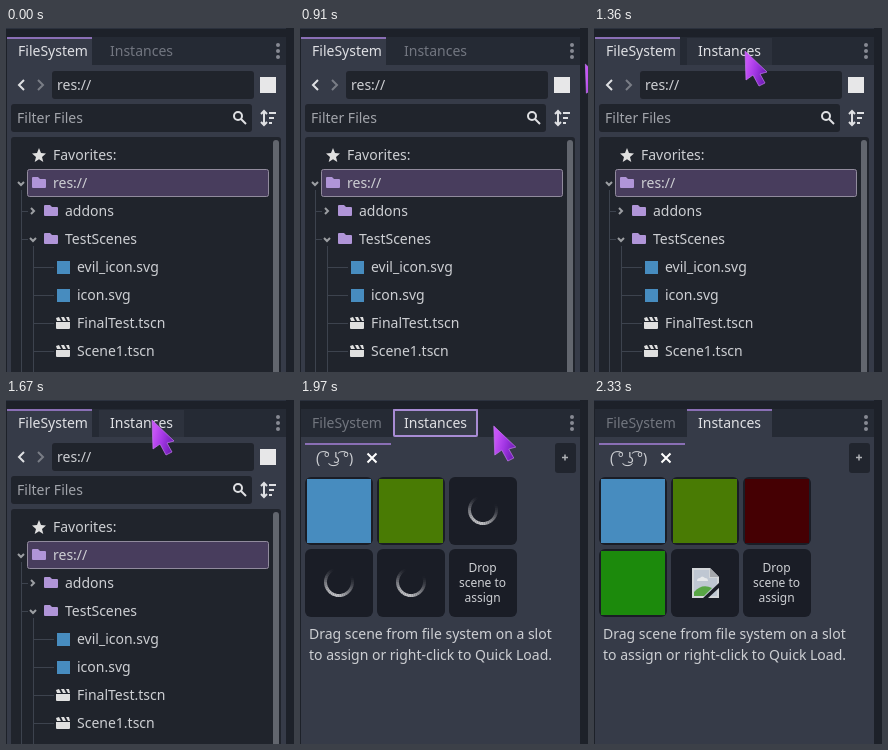
Recreate the animation shown at these times as an HTML page. Size 288 px wide and 344 px high, loop 3030 ms.

```html
<!DOCTYPE html>
<html lang="en">
<head>
<meta charset="utf-8">
<style>
  html, body { margin: 0; height: 100%; overflow: hidden; background: #1d2129; }
  svg { display: block; }
  text { font: 14px "Noto Sans", "Open Sans", sans-serif; fill: #cdcfd3; white-space: pre; }
  .line { fill: none; stroke: #3d434e; }
  .icon { fill: none; stroke: #dfe0e3; stroke-width: 2; }
  .thin { stroke-width: 1.5; }
  .dark { fill: #20242c; }
  .slot { fill: #1a1d26; }
  .small { font-size: 12px; text-anchor: middle; }
</style>
</head>
<body>
<svg width="288" height="344" viewBox="0 0 288 344">
  <defs>
    <linearGradient id="purple" x1="0" y1=".3" x2="1" y2=".7">
      <stop offset=".1" stop-color="#c653f6"/>
      <stop offset=".5" stop-color="#a236e4"/>
      <stop offset="1" stop-color="#6a1bb0"/>
    </linearGradient>
    <path id="folder" d="M-7-5q0-1 1-1h5l2 2h5q1 0 1 1v7q0 1-1 1H-6q-1 0-1-1z" fill="#b095d8"/>
    <path id="clapper" fill="#e0e0e0" d="M-7-1H7V5q0 1-1 1H-6q-1 0-1-1zM-7-5l3-1 2 4h-4zM-2-6h3l2 4H0zM3-6h3l1 4H5z"/>
    <g id="spinner"></g>
  </defs>

  <path fill="#2b313d" d="M0 0H280V1H0z"/>
  <path fill="#252a34" d="M1 9H280V37H1z"/>
  <path fill="#363b48" d="M1 37H280V344H1z"/>
  <path id="hover" fill="#2d323d" d="M93 10H178V37H93z"/>
  <g id="tab">
    <path fill="#363b48" d="M0 10H85V38H0z"/>
    <path fill="#8a6fb5" d="M0 9H85V11H0z"/>
  </g>
  <rect id="focus" x="94" y="10" width="83" height="26" rx="1" fill="none" stroke="#a88cd4" stroke-width="2"/>
  <text id="filesTitle" x="12" y="28">FileSystem</text>
  <text id="slotsTitle" x="104" y="28">Instances</text>
  <g fill="#878a93"><circle cx="272" cy="17" r="2"/><circle cx="272" cy="23" r="2"/><circle cx="272" cy="29" r="2"/></g>

  <g id="files">
    <path class="icon" d="M18 52l-5 5 5 5"/>
    <path class="icon" d="M32 52l5 5-5 5" opacity=".4"/>
    <rect class="dark" x="46" y="43" width="202" height="28" rx="3"/>
    <text x="51" y="62">res://</text>
    <path fill="#e7e7e8" d="M254 49h16v16h-16z"/>
    <rect class="dark" x="5" y="76" width="241" height="28" rx="3"/>
    <text x="11" y="95" style="fill:#a1a4aa">Filter Files</text>
    <g class="icon"><circle cx="232" cy="88" r="4"/><path d="M235 91l5 5"/></g>
    <path class="icon" d="M258 84v12M255 86l3-3 3 3M255 94l3 3 3-3M263 85h7M263 90h5M263 95h3"/>
    <path fill="#20242c" d="M5 112q0-3 3-3H272q3 0 3 3V344H5z"/>
    <rect x="267" y="112" width="6" height="240" rx="3" fill="#62666e"/>
    <path class="line" d="M15.5 162V344M15 183.5h7M15 211.5h7M27.5 218V344M27 239.5h21M27 267.5h21M27 295.5h21M27 323.5h21"/>
    <rect x="21.5" y="141.5" width="241" height="27" rx="2" fill="#483d5d" stroke="#918b9d"/>
    <path fill="#e0e0e0" d="M33 120l2 5 5 .4-4 3.5 1.3 5.1-4.3-2.7-4.3 2.7 1.3-5.1-4-3.5 5-.4z"/>
    <path class="icon" opacity=".65" d="M12 154l3 3 3-3M25 180l3 3-3 3M24 210l3 3 3-3"/>
    <use href="#folder" x="33" y="155"/>
    <use href="#folder" x="45" y="183"/>
    <use href="#folder" x="45" y="211"/>
    <path fill="#478cbf" d="M51 233h13v13H51zM51 261h13v13H51z"/>
    <use href="#clapper" x="57" y="295"/>
    <use href="#clapper" x="57" y="323"/>
    <text x="47" y="132">Favorites:</text>
    <text x="47" y="160">res://</text>
    <text x="59" y="188">addons</text>
    <text x="59" y="216">TestScenes</text>
    <text x="71" y="244">evil_icon.svg</text>
    <text x="71" y="272">icon.svg</text>
    <text x="71" y="300">FinalTest.tscn</text>
    <text x="71" y="328">Scene1.tscn</text>
  </g>

  <g id="slots">
    <path fill="#8a6fb5" d="M5 43H91V45H5z"/>
    <text x="16" y="63">( ͡° ͜ʖ ͡°)</text>
    <path class="icon" d="M67.5 53.5l9 9M76.5 53.5l-9 9" style="stroke:#fff"/>
    <rect x="255" y="43" width="21" height="30" rx="3" fill="#21252e"/>
    <path class="icon thin" d="M262 57.5h6M265 54.5v6" opacity=".75"/>
    <g id="grid"></g>
    <rect class="slot" x="149" y="149" width="68" height="68" rx="6"/>
    <text class="small" x="182.5" y="172">Drop</text>
    <text class="small" x="182.5" y="187">scene to</text>
    <text class="small" x="182.5" y="202">assign</text>
    <g id="broken" transform="translate(98 168)">
      <path fill="#d3d6d9" d="M0 0H18L27 9V30H0z"/>
      <path fill="#bfc7d2" d="M2 2H17V10H25V28H2z"/>
      <path fill="#e6e8ea" d="M5 13q0-3 3-3 2-3 5 0 3 0 3 3z"/>
      <path fill="#58a545" d="M2 28V24Q10 15 20 20L12 28z"/>
      <path fill="#a5a8ad" d="M18 0V9H27z"/>
      <path fill="#1a1d26" d="M28 14L10 31H15L28 19z"/>
    </g>
    <text x="9" y="239">Drag scene from file system on a slot</text>
    <text x="9" y="260">to assign or right-click to Quick Load.</text>
  </g>

  <path id="cursor" d="M0 0L1 29 8 24 14 35 20 32 15 23 22 21z" fill="url(#purple)" stroke="#c47af0" stroke-opacity=".7" stroke-linejoin="round"/>
</svg>
<script>
const LOOP = 3030, OPEN = 1850;
const $ = id => document.getElementById(id);
const show = (el, on) => el.style.display = on ? "" : "none";

// Spinner: an open ring, brightest in the middle (angle 0) and fading to both ends
const SEGMENTS = 36, STEP = 0.14;
const point = a => `${13.5 * Math.cos(a)} ${13.5 * Math.sin(a)}`;
$("spinner").innerHTML = Array.from({ length: SEGMENTS }, (_, i) => {
  const a = (i - SEGMENTS / 2) * STEP;
  const glow = Math.sin(Math.PI * (i + 0.5) / SEGMENTS) ** 2;
  return `<path d="M${point(a)}A13.5 13.5 0 0 1 ${point(a + STEP)}" fill="none"
    stroke="#e0e0e2" stroke-width="3" opacity="${glow * 0.85}"/>`;
}).join("");

const loads = [
  [1880, "#478cbf"], [1940, "#497b04"], [2030, "#450003"], [2090, "#1c8a0c"], [2330, null]
];
$("grid").innerHTML = loads.map(([, color], i) => `
  <g transform="translate(${5 + i % 3 * 72} ${77 + Math.floor(i / 3) * 72})">
    <rect class="slot" width="68" height="68" rx="6"/>
    <g class="wait"><use href="#spinner"/></g>
    ${color ? `<path class="done" fill="${color}" d="M2 2H66V66H2z"/>` : ""}
  </g>`).join("");
const cells = [...$("grid").children].map(g => ({
  wait: g.querySelector(".wait"),
  done: g.querySelector(".done") || $("broken")
}));

const path = [
  [910, 286, 36], [990, 236, 46], [1120, 167, 33], [1240, 138, 22],
  [1360, 151, 23], [1520, 151, 23], [1670, 146, 20], [OPEN, 146, 20]
];

function cursorAt(t) {
  if (t >= OPEN) {
    const u = (t - OPEN) / 120;
    return [146 + 47 * u * u, 20 + 6 * u];
  }
  const i = path.findIndex(p => p[0] > t);
  const [t0, x0, y0] = path[i - 1], [t1, x1, y1] = path[i];
  const k = (t - t0) / (t1 - t0);
  return [x0 + (x1 - x0) * k, y0 + (y1 - y0) * k];
}

function draw(t) {
  const open = t >= OPEN;
  const hover = !open && t >= 1180;
  show($("files"), !open);
  show($("slots"), open);
  show($("hover"), hover);
  show($("focus"), open && t < 2060);
  $("tab").setAttribute("transform", `translate(${open ? 93 : 1} 0)`);
  $("filesTitle").style.fill = open ? "#72767f" : "#dfe0e4";
  $("slotsTitle").style.fill = open || hover ? "#dfe0e4" : "#727680";

  const angle = 110 + (t - 1970) * 0.6;
  cells.forEach(({ wait, done }, i) => {
    const ready = t >= loads[i][0];
    show(wait, !ready);
    show(done, ready);
    wait.setAttribute("transform", `translate(34 33) rotate(${angle})`);
  });

  const visible = t >= 910 && t < 2100;
  show($("cursor"), visible);
  if (visible) $("cursor").setAttribute("transform", `translate(${cursorAt(t)})`);
}

function tick() {
  draw(performance.now() % LOOP);
  requestAnimationFrame(tick);
}
tick();
</script>
</body>
</html>
```
